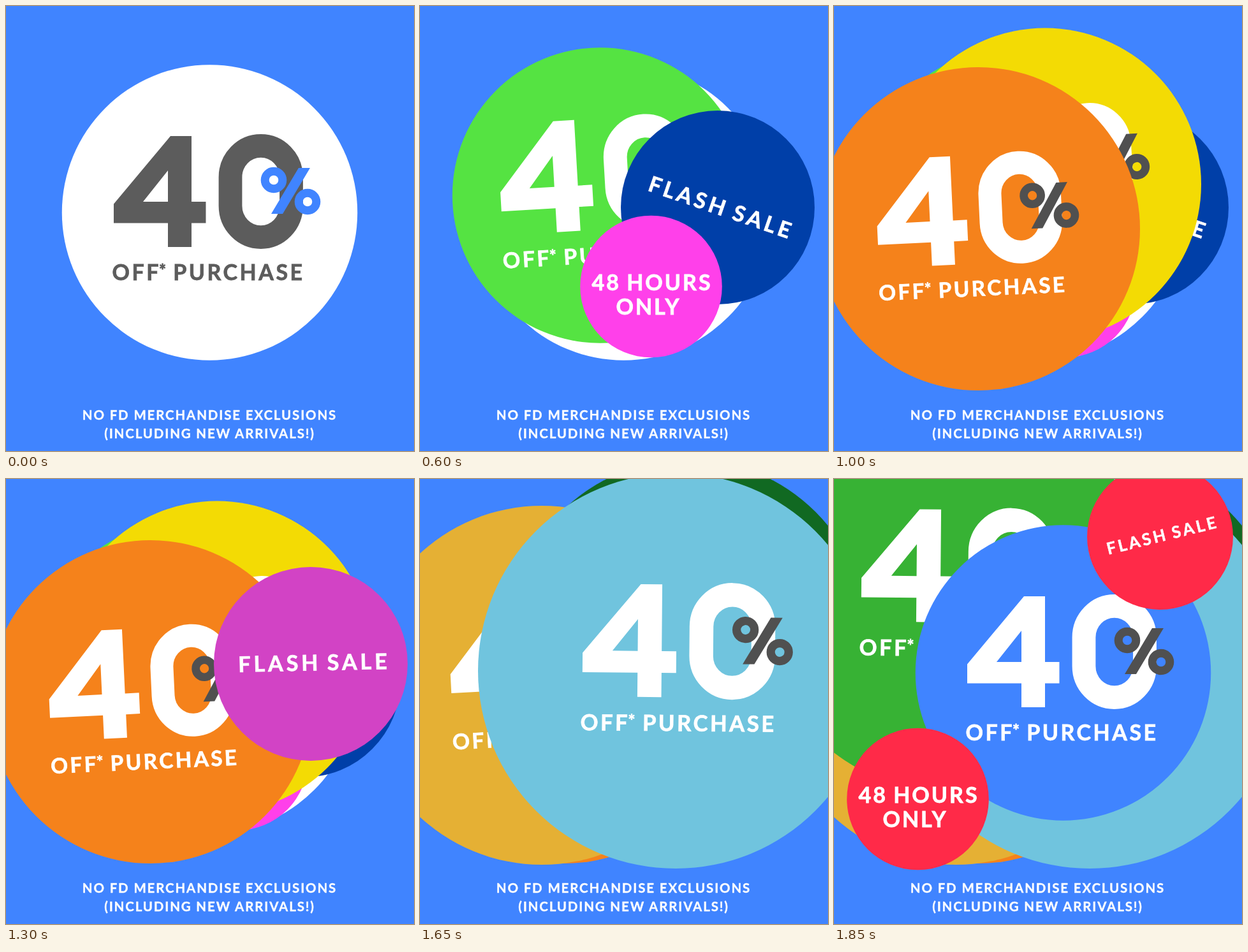
Animation, 640 px wide and 698 px high, one loop 4.35 s. Source, as an HTML page:

```html
<!DOCTYPE html>
<html lang="en">
<head>
<meta charset="utf-8">
<title>Flash sale</title>
<style>
  html, body { margin: 0; width: 100%; height: 100%; overflow: hidden; background: #4084ff; }
  svg { display: block; width: 640px; height: 698px; }
  text { font: 700 34px Lato, "Open Sans", sans-serif; fill: currentColor; stroke: currentColor; stroke-width: .8; }
  .mid { text-anchor: middle; }
  .offer { letter-spacing: 3.5px; }
  .star { font-size: 26px; }
  .flash { letter-spacing: 5px; word-spacing: -4px; }
  .hours { letter-spacing: 3px; word-spacing: -2px; }
  .note { font-size: 20.5px; letter-spacing: 1.85px; stroke-width: .4; color: #fff; }
</style>
</head>
<body>
<svg viewBox="0 0 640 698">
  <defs>
    <!-- lettering is drawn around the centre of its disc -->
    <g id="forty" transform="translate(-319.5 -324)">
      <path fill="currentColor" fill-rule="evenodd"
        d="M258 204H291V307H313.500V340.500H291V378H254V340.500H169V310.500ZM254 258L215 307H254Z"/>
      <rect x="352" y="219.400" width="95.500" height="143.200" rx="47.700" ry="49"
        fill="none" stroke="currentColor" stroke-width="36.800"/>
      <text class="offer"><tspan x="166.500" y="430">OFF</tspan><tspan
        class="star" x="240" y="424">*</tspan><tspan x="262.300" y="430">PURCHASE</tspan></text>
    </g>
    <g id="percent" transform="translate(-319.5 -324)">
      <path fill="currentColor" d="M416 326H434L477 254H459Z"/>
      <g fill="none" stroke="currentColor" stroke-width="13">
        <circle cx="420" cy="273" r="13.800"/>
        <circle cx="473" cy="307" r="13.800"/>
      </g>
    </g>
    <text id="flash" class="mid flash" x="5.5" y="10.500">FLASH SALE</text>
    <g id="hours">
      <text class="mid hours" x="1.500" y="6">48 HOURS</text>
      <text class="mid hours" x="-4" y="44">ONLY</text>
    </g>
  </defs>
  <g id="discs"></g>
  <text class="mid note" x="319.500" y="649">NO FD MERCHANDISE EXCLUSIONS</text>
  <text class="mid note" x="319.500" y="678">(INCLUDING NEW ARRIVALS!)</text>
</svg>
<script>
const LOOP = 4350;

function disc(color, x, y, r, lettering, { dx = 0, dy = 0, turn = 0, size = 1 }) {
  return `<g><circle cx="${x}" cy="${y}" r="${r}" fill="${color}"/>
    <g transform="translate(${x + dx} ${y + dy}) rotate(${turn}) scale(${size})">${lettering}</g></g>`;
}

const use = (id, color) => `<use href="#${id}" color="${color}"/>`;

function forty(color, x, y, r = 231.75, { ink = '#fff', percent = '#505050', ...pose } = {}) {
  return disc(color, x, y, r, use('forty', ink) + use('percent', percent), pose);
}

const flash = (color, x, y, r, turn) => disc(color, x, y, r, use('flash', '#fff'), { turn, size: r / 152 });
const hours = (color, x, y) => disc(color, x, y, 111.3, use('hours', '#fff'), {});

const raised = { dx: 7, dy: -13.5, turn: .5, size: 1.017 };

const stack = [
  forty('#fff', 319.5, 324, undefined, { ink: '#5c5c5c', percent: '#4084ff' }),
  forty('#55e342', 282.5, 297, undefined, { dx: -5.4, turn: -3.3 }),
  flash('#003fa8', 467, 316, 152, 18.9),
  hours('#ff40ea', 362.5, 440),
  forty('#f3db04', 331, 279.5, 245, { dx: -5.7, dy: -1.5, turn: -3.5, size: .985 }),
  forty('#f5821b', 226.5, 349.5, 253.5, { dx: -11.2, dy: 2.2, turn: -2.7, size: .978 }),
  flash('#d243c5', 478, 290, 152, -1.2),
  forty('#116922', 421, 251, 282, { dx: -5.7, dy: -1.2, turn: 7.7, size: 1.08 }),
  forty('#e5b034', 191, 323.5, 281.5, { dx: 6.2, dy: -11.7, turn: -3, size: .99 }),
  forty('#70c4de', 401, 301, 310, raised),
  forty('#37b234', 189, 183.5, 310, raised),
  forty('#4084ff', 359.5, 304),
  flash('#ff2a48', 511.5, 90.5, 114.5, -13.9),
  hours('#ff2a48', 131.5, 502)
];

// discs land in ever quicker runs: [last beat of the run, pause before each]
const runs = [[5, 200], [6, 300], [8, 100], [9, 150], [13, 50]];
const starts = [0];
for (const [last, pause] of runs) {
  while (starts.length <= last) starts.push(starts.at(-1) + pause);
}

const discs = document.getElementById('discs');
discs.innerHTML = stack.join('');
const layers = [...discs.children];
const begin = performance.now();

function draw() {
  const time = Math.max(0, performance.now() - begin) % LOOP;
  layers.forEach((layer, i) => {
    layer.style.display = time >= starts[i] ? '' : 'none';
  });
  requestAnimationFrame(draw);
}
draw();
</script>
</body>
</html>
```
